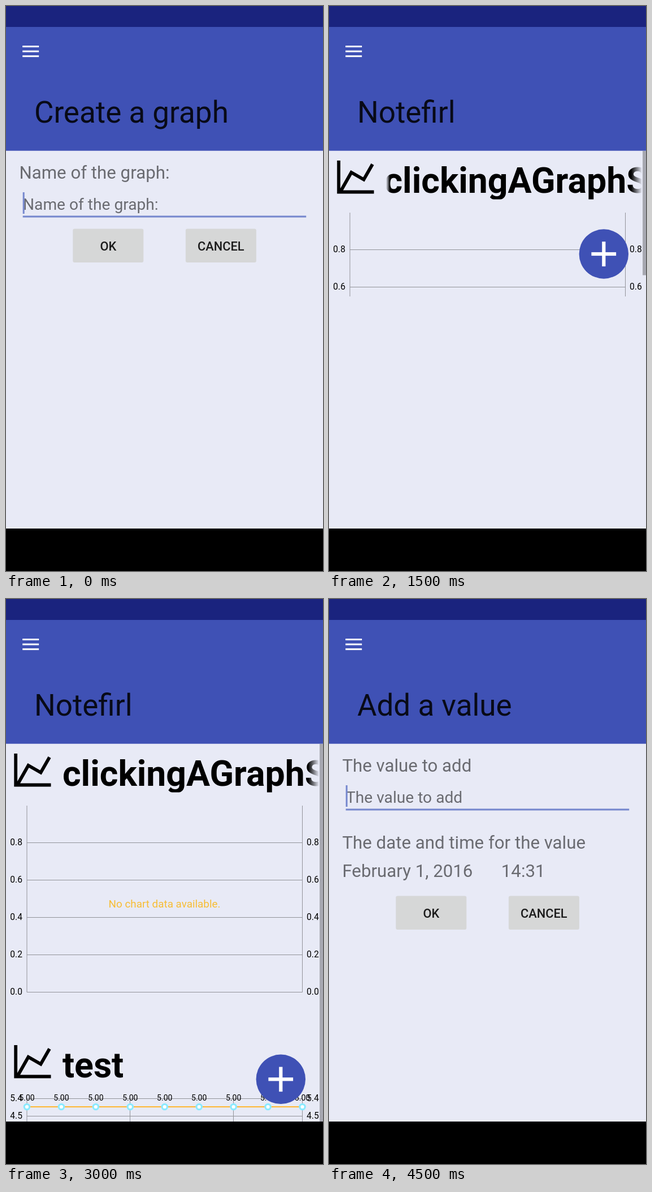
Animation of 561 by 998 pixels, one loop 6000 ms. Source, as an HTML page:

```html
<!DOCTYPE html>
<html lang="en">
<head>
<meta charset="utf-8">
<title>Graph app screens</title>
<style>
  html, body { margin: 0; width: 100%; height: 100%; overflow: hidden; background: #e8eaf6; }
  svg { display: block; width: 100%; height: 100%; }
  text { font-family: Roboto, sans-serif; white-space: pre; }
</style>
</head>
<body>
<svg id="stage" viewBox="0 0 561 998">
  <defs>
    <linearGradient id="edge" gradientUnits="userSpaceOnUse" x1="101" x2="554">
      <stop offset="0.957" stop-color="#fff"/>
      <stop offset="1" stop-color="#000"/>
    </linearGradient>
    <linearGradient id="edges" gradientUnits="userSpaceOnUse" x1="101" x2="554">
      <stop offset="0" stop-color="#000"/>
      <stop offset="0.015" stop-color="#fff"/>
      <stop offset="0.957" stop-color="#fff"/>
      <stop offset="1" stop-color="#000"/>
    </linearGradient>
    <mask id="fadeRight" maskUnits="userSpaceOnUse" x="0" y="256" width="561" height="100">
      <rect x="101" y="262" width="452.5" height="79.5" fill="url(#edge)"/>
    </mask>
    <mask id="fadeBoth" maskUnits="userSpaceOnUse" x="0" y="256" width="561" height="100">
      <rect x="101" y="262" width="452.5" height="79.5" fill="url(#edges)"/>
    </mask>
    <clipPath id="shortChart"><rect x="0" y="256" width="561" height="257"/></clipPath>
  </defs>
</svg>
<script>
const NS = 'http://www.w3.org/2000/svg';
const stage = document.getElementById('stage');
const STEP = 1500;
const INDIGO = '#3f51b5', ACCENT = '#7688ce', MUTED = '#6a6b71', GRID = '#929399';
const BODY = 31.25, HINT = 28.15;

function add(parent, tag, attrs = {}) {
  const el = document.createElementNS(NS, tag);
  for (const key in attrs) el.setAttribute(key, attrs[key]);
  parent.appendChild(el);
  return el;
}
const rect = (p, x, y, width, height, fill, rx = 0) =>
  add(p, 'rect', { x, y, width, height, fill, rx });
const line = (p, x1, y1, x2, y2, stroke = GRID, w = 1) =>
  add(p, 'line', { x1, y1, x2, y2, stroke, 'stroke-width': w });
function label(p, str, x, y, size, fill, extra = {}) {
  const el = add(p, 'text', { x, y, 'font-size': size, fill, ...extra });
  el.textContent = str;
  return el;
}
const CENTER = { 'text-anchor': 'middle' }, RIGHT = { 'text-anchor': 'end' };

function heading(p, str) {
  label(p, str, 49.9, 205.7, 53, '#080a17');
}

function button(p, str, x, y) {
  rect(p, x, y, 125, 59.5, '#d6d7d7', 3);
  label(p, str, x + 62.5, y + 38.5, 21.8, '#1b1b1b', { ...CENTER, 'font-weight': 500 });
}

function form(p, title, field, buttonY) {
  heading(p, title);
  label(p, field, 23.4, 304.5, BODY, MUTED);
  label(p, field, 30, 359.5, HINT, MUTED);
  rect(p, 29.7, 329, 3, 38, ACCENT);
  rect(p, 29.7, 370.4, 501.5, 3.1, ACCENT);
  button(p, 'OK', 118.3, buttonY);
  button(p, 'CANCEL', 317.9, buttonY);
}

// scroll: how far the marquee has moved the name to the left
function graphTitle(p, str, dy, mask, scroll = 0) {
  const g = add(p, 'g', { transform: `translate(0 ${dy})` });
  add(g, 'path', {
    d: 'M17.2 273V328.5H79.5M20.5 327.5L39.5 294L61.5 306.5L77 279.5',
    fill: 'none', stroke: '#000', 'stroke-width': 5.8
  });
  const box = add(g, 'g', mask ? { mask: `url(#${mask})` } : {});
  label(box, str, 100 - scroll, 330, 62.5, '#000', { 'font-weight': 700 });
}

function gridRow(p, str, y) {
  line(p, 37, y, 524.5, y);
  label(p, str, 29, y + 4.6, 15.6, '#000', RIGHT);
  label(p, str, 532, y + 4.6, 15.6, '#000');
}

function emptyChart(p) {
  for (const x of [37, 524.5]) line(p, x, 365, x, 694.5);
  for (let i = 0; i < 5; i++) gridRow(p, (0.8 - i * 0.2).toFixed(1), 430.5 + i * 66);
  label(p, 'No chart data available.', 280.5, 544.5, 18.85, '#f7bd33', CENTER);
}

function flatChart(p) {
  for (const x of [37, 219.5, 402.5, 524.5]) line(p, x, 882.5, x, 923);
  gridRow(p, '5.4', 882.5);
  gridRow(p, '4.5', 913.5);
  line(p, 37, 897, 524.5, 897, '#ffb733', 2.2);
  for (let i = 0; i < 9; i++) {
    const x = 37 + i * 60.94;
    label(p, '5.00', x, 886, 14, '#000', CENTER);
    add(p, 'circle', { cx: x, cy: 897, r: 4.7, fill: '#fff', stroke: '#8ceaff', 'stroke-width': 3.2 });
  }
}

function addButton(p, y) {
  add(p, 'circle', { cx: 486.3, cy: y, r: 43.7, fill: INDIGO });
  rect(p, 464.4, y - 3.1, 43.7, 6.2, '#fff');
  rect(p, 483.2, y - 21.8, 6.2, 43.7, '#fff');
}

const APP = 'Notefirl';
const LONG = 'clickingAGraphS';

const screens = [
  g => form(g, 'Create a graph', 'Name of the graph:', 393.6),
  g => {
    heading(g, APP);
    graphTitle(g, LONG, 0, 'fadeBoth', 2.5);
    emptyChart(add(g, 'g', { 'clip-path': 'url(#shortChart)' }));
    rect(g, 555, 256, 6, 219.5, '#a7a8b1');
    addButton(g, 438);
  },
  g => {
    heading(g, APP);
    graphTitle(g, LONG, 0, 'fadeRight');
    emptyChart(g);
    graphTitle(g, 'test', 515);
    flatChart(g);
    rect(g, 555, 256, 6, 667, '#a7a8b1');
    addButton(g, 848.3);
  },
  g => {
    form(g, 'Add a value', 'The value to add', 524.6);
    label(g, 'The date and time for the value', 23.4, 441, BODY, MUTED);
    label(g, 'February 1, 2016', 23.4, 491, BODY, MUTED);
    label(g, '14:31', 304.8, 491, BODY, MUTED);
  }
];

rect(stage, 0, 0, 561, 998, '#e8eaf6');
rect(stage, 0, 0, 561, 37, '#1a237e');
rect(stage, 0, 37, 561, 218.7, INDIGO);
for (let i = 0; i < 3; i++) rect(stage, 29.2, 70 + i * 8.6, 29, 3, '#fff');

const layers = screens.map(draw => {
  const g = add(stage, 'g');
  draw(g);
  return g;
});
rect(stage, 0, 923, 561, 75, '#000');

function render(ms) {
  const current = Math.floor(ms / STEP) % layers.length;
  layers.forEach((g, i) => g.setAttribute('display', i === current ? 'inline' : 'none'));
}

const start = performance.now();
function tick() {
  render(performance.now() - start);
  requestAnimationFrame(tick);
}
tick();
</script>
</body>
</html>
```
